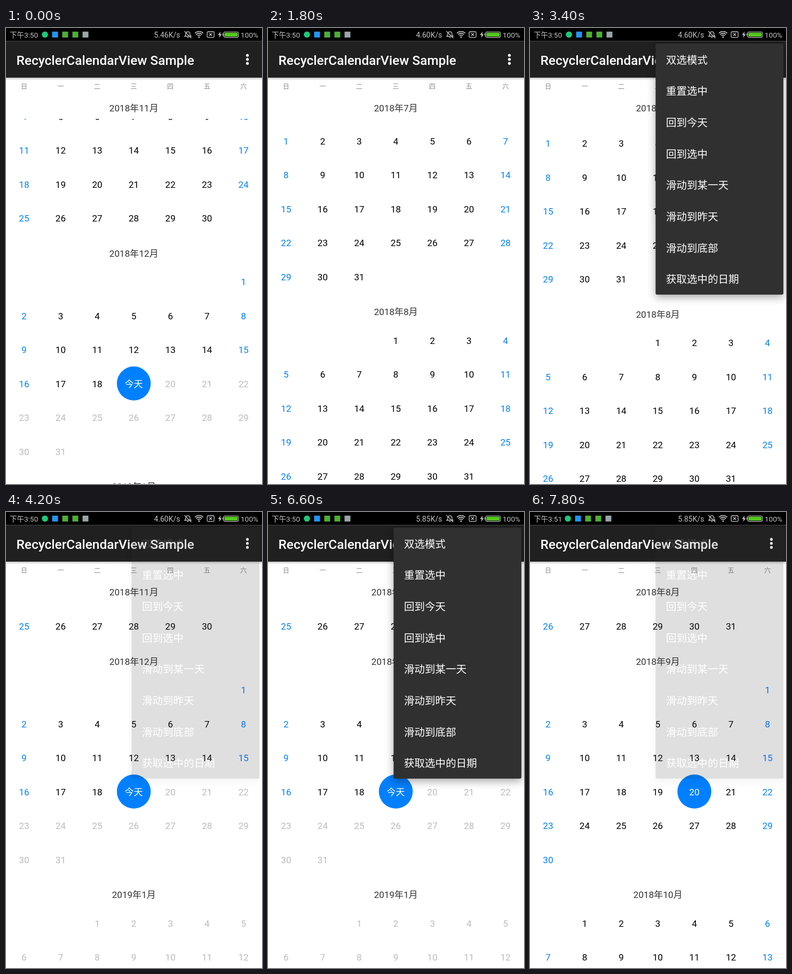
Write an HTML page with a canvas that moves like this. It is 480 px wide and 853 px high and loops after 8000 ms.

```html
<!DOCTYPE html>
<html lang="zh-CN">
<head>
<meta charset="utf-8">
<title>RecyclerCalendarView Sample</title>
<style>
  html, body { margin: 0; width: 100%; height: 100%; overflow: hidden; background: #fff; }
  canvas { display: block; width: 480px; height: 853px; }
</style>
</head>
<body>
<canvas id="stage"></canvas>
<script>
const W = 480, H = 853, LOOP = 8000, STEP = 200;
const FONT = 'Roboto, "Noto Sans CJK SC", "Noto Sans CJK JP", sans-serif';
const BLUE = '#0080ff';
const ROW = 63.5, HEAD_TO_ROW = 53.6, ROW_TO_HEAD = 65.3;
const STICKY_BOTTOM = 170;
const MENU = { x: 235.5, y: 29.3, w: 239.6, row: 58.67 };
const ITEMS = ['双选模式', '重置选中', '回到今天', '回到选中',
  '滑动到某一天', '滑动到昨天', '滑动到底部', '获取选中的日期'];
const TODAY = new Date(2018, 11, 19);

// Scroll offsets, measured from the July header
const START = 1506.5, TOP = -162.6, AT_TODAY = 1648.5, AT_DAY = 466.3;

function makeCanvas(canvas) {
  const dpr = window.devicePixelRatio || 1;
  canvas.width = W * dpr;
  canvas.height = H * dpr;
  const c = canvas.getContext('2d');
  c.scale(dpr, dpr);
  return c;
}
const ctx = makeCanvas(document.getElementById('stage'));
const menuLayer = document.createElement('canvas');
const menuCtx = makeCanvas(menuLayer);

const clamp = v => Math.max(0, Math.min(1, v));
const easeOut = (p, k) => 1 - Math.pow(1 - clamp(p), k);

function text(c, str, x, y, size, color, align = 'center', weight = 400) {
  c.font = `${weight} ${size}px ${FONT}`;
  c.textAlign = align;
  c.fillStyle = color;
  c.fillText(str, x, y);
}

function rect(x, y, w, h, color) {
  ctx.fillStyle = color;
  ctx.fillRect(x, y, w, h);
}

function disc(x, y, r, color) {
  ctx.fillStyle = color;
  ctx.beginPath();
  ctx.arc(x, y, r, 0, Math.PI * 2);
  ctx.fill();
}

function roundRect(c, x, y, w, h, r) {
  c.beginPath();
  c.moveTo(x + r, y);
  c.arcTo(x + w, y, x + w, y + h, r);
  c.arcTo(x + w, y + h, x, y + h, r);
  c.arcTo(x, y + h, x, y, r);
  c.arcTo(x, y, x + w, y, r);
  c.closePath();
}

function poly(points, close) {
  ctx.beginPath();
  points.forEach(([x, y], i) => i ? ctx.lineTo(x, y) : ctx.moveTo(x, y));
  if (close) ctx.closePath();
}

function buildMonths() {
  const list = [];
  let top = 0;
  for (let i = 0; i < 7; i++) {
    const first = new Date(2018, 6 + i, 1);
    const year = first.getFullYear(), month = first.getMonth();
    const days = new Date(year, month + 1, 0).getDate();
    const lead = first.getDay();
    const rows = Math.ceil((lead + days) / 7);
    list.push({ year, month, days, lead, top, label: `${year}年${month + 1}月` });
    top += HEAD_TO_ROW + (rows - 1) * ROW + ROW_TO_HEAD;
  }
  return list;
}
const months = buildMonths();
const colX = i => 33.9 + i * W / 7;

function scrollAt(t) {
  if (t >= 7800) return AT_DAY;
  if (t >= 4200) return AT_TODAY;
  return START + (TOP - START) * easeOut((t - 500) / 2000, 5.65);
}

function drawDay(m, day, y, selected) {
  const col = (m.lead + day - 1) % 7, x = colX(col);
  const date = new Date(m.year, m.month, day);
  const isToday = +date === +TODAY;
  let color = col === 0 || col === 6 ? BLUE : '#000';
  if (date > TODAY) color = '#bbb';
  if (+date === +selected) {
    disc(x, y - 0.7, 31.8, BLUE);
    color = '#fff';
  }
  text(ctx, isToday ? '今天' : String(day), x, y + 6.1, 17.11, color);
}

function drawCalendar(t) {
  const scroll = scrollAt(t);
  const selected = t >= 7800 ? new Date(2018, 8, 20) : TODAY;
  let sticky = months[0];
  for (const m of months) {
    const head = m.top - scroll;
    if (head < STICKY_BOTTOM + 2) sticky = m;
    else if (head < H + 20) text(ctx, m.label, 239.8, head + 6.1, 17.11, '#333');
    for (let d = 1; d <= m.days; d++) {
      const y = head + HEAD_TO_ROW + Math.floor((m.lead + d - 1) / 7) * ROW;
      if (y > 120 && y < H + 40) drawDay(m, d, y, selected);
    }
  }
  rect(0, 93, W, STICKY_BOTTOM - 93, '#fff');
  text(ctx, sticky.label, 239.8, 156.2, 17.11, '#333');
  [...'日一二三四五六'].forEach((s, i) => text(ctx, s, colX(i), 113.6, 12.2, '#8c8c8c'));
}

function drawStatus(t) {
  const late = t >= 7600, grey = '#c4c4c4';
  rect(0, 0, W, 24.4, '#000');
  text(ctx, late ? '下午3:51' : '下午3:50', 7, 17.5, 13.5, grey, 'left');

  const dx = late ? -2 : 0;
  disc(73 + dx, 12.3, 5.8, '#1fc77a');
  [['#2196f3', 92], ['#4fae34', 111], ['#4fae34', 130], ['#9aa5a8', 149]]
    .forEach(([color, x]) => rect(x - 5.5 + dx, 6.8, 11, 11, color));

  const speed = t < 800 ? '5.46K/s' : t < 4600 ? '4.60K/s' : '5.85K/s';
  text(ctx, speed, 326.5, 17.5, 14, grey, 'right');

  ctx.strokeStyle = ctx.fillStyle = grey;
  ctx.lineWidth = 1.3;
  // Muted bell
  poly([[335, 15.5], [337, 13.5], [337, 10], [339, 7.2], [343, 7.2], [345, 10], [345, 13.5], [347, 15.5]], true);
  ctx.stroke();
  poly([[339.5, 17.8], [342.5, 17.8]]);
  ctx.stroke();
  poly([[334.5, 6], [347.5, 19]]);
  ctx.stroke();
  // Wi-Fi
  ctx.lineWidth = 1.7;
  for (const r of [4.2, 7.6, 11]) {
    ctx.beginPath();
    ctx.arc(362, 17.5, r, -Math.PI * 0.75, -Math.PI * 0.25);
    ctx.stroke();
  }
  disc(362, 17, 1.5, grey);
  // Empty SIM slot
  ctx.lineWidth = 1.3;
  roundRect(ctx, 377.2, 7, 13, 10.6, 1.5);
  ctx.stroke();
  poly([[381.2, 9.8], [386.2, 14.8]]);
  ctx.stroke();
  poly([[386.2, 9.8], [381.2, 14.8]]);
  ctx.stroke();
  // Charging battery
  poly([[402.5, 6.5], [397.5, 13], [400.5, 13], [399.5, 18.5], [404.5, 11.5], [401.5, 11.5]], true);
  ctx.fill();
  rect(406, 10.3, 1.5, 4, grey);
  roundRect(ctx, 408, 7.2, 28, 10.4, 3);
  ctx.lineWidth = 1.1;
  ctx.stroke();
  roundRect(ctx, 409.5, 8.7, 25, 7.4, 2);
  ctx.fillStyle = '#55c81e';
  ctx.fill();
  text(ctx, '100%', 473, 17.5, 13.6, grey, 'right');
}

function drawAppBar() {
  const shade = ctx.createLinearGradient(0, 93, 0, 98);
  shade.addColorStop(0, 'rgba(0,0,0,0.2)');
  shade.addColorStop(1, 'rgba(0,0,0,0)');
  rect(0, 93, W, 5, shade);
  rect(0, 24.4, W, 68.5, '#202020');
  text(ctx, 'RecyclerCalendarView Sample', 19.6, 68.7, 24.44, '#fff', 'left', 500);
  [51.2, 58.7, 66.2].forEach(y => disc(452.6, y, 2.6, '#fff'));
}

function paintMenu() {
  const c = menuCtx, h = MENU.row * ITEMS.length;
  c.clearRect(0, 0, W, H);
  c.save();
  c.shadowColor = 'rgba(0,0,0,0.35)';
  c.shadowBlur = 16 * (window.devicePixelRatio || 1);
  c.shadowOffsetY = 5 * (window.devicePixelRatio || 1);
  c.fillStyle = '#303030';
  roundRect(c, MENU.x, MENU.y, MENU.w, h, 2.4);
  c.fill();
  c.restore();
  ITEMS.forEach((s, i) =>
    text(c, s, 255, MENU.y + MENU.row * (i + 0.5) + 8, 19.55, '#fff', 'left'));
}

function drawMenu(t) {
  const [open, close] = t < 5000 ? [2950, 4030] : [6150, 7630];
  const shown = easeOut((t - open) / 400, 2);
  const alpha = Math.min(shown * 1.3, 1) * (1 - clamp((t - close) / 200));
  if (alpha <= 0) return;
  ctx.save();
  ctx.globalAlpha = alpha;
  if (shown < 1) {
    // Unfolds from the top right corner
    const w = MENU.w * shown, h = MENU.row * ITEMS.length * shown;
    ctx.beginPath();
    ctx.rect(MENU.x + MENU.w - w, MENU.y, w, h);
    ctx.clip();
  }
  ctx.drawImage(menuLayer, 0, 0, W, H);
  ctx.restore();
}

function frame(now) {
  const t = Math.floor((now - begin) % LOOP / STEP) * STEP;
  rect(0, 0, W, H, '#fff');
  drawCalendar(t);
  drawAppBar();
  drawStatus(t);
  paintMenu();
  drawMenu(t);
  requestAnimationFrame(frame);
}

const begin = performance.now();
frame(begin);
</script>
</body>
</html>
```
